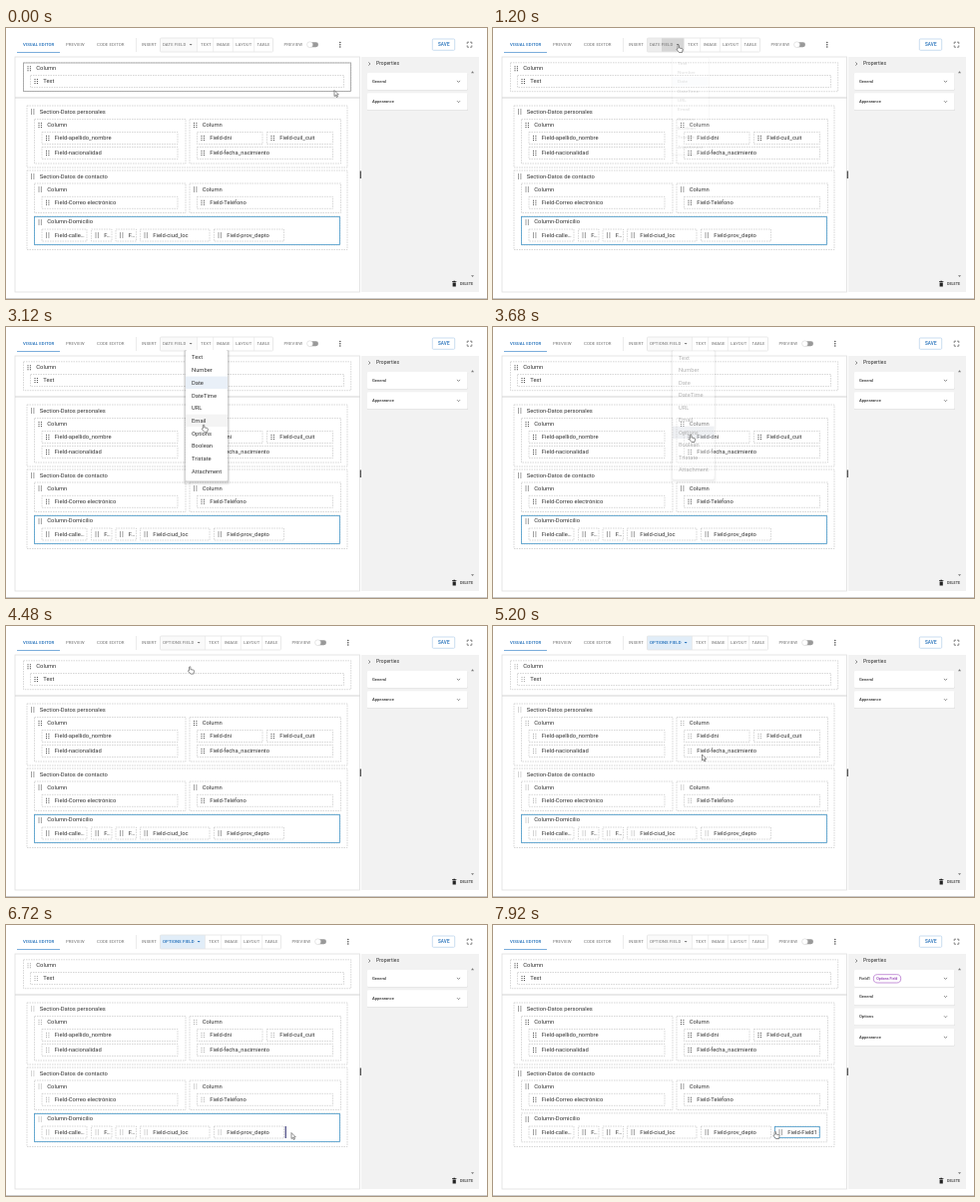
An HTML page for the animation above (8000 ms loop, 482 by 272 pixels).

```html
<!DOCTYPE html>
<html lang="es">
<head>
<meta charset="utf-8">
<title>Form editor</title>
<style>
html, body { margin: 0; width: 100%; height: 100%; overflow: hidden; background: #fff; }
svg { display: block; width: 482px; height: 272px; font-family: Roboto, sans-serif; }
.dash { fill: #fff; stroke: #bdbdbd; stroke-width: .6; stroke-dasharray: 1.5 1; }
.solid { fill: none; stroke-width: .8; }
.label { font-size: 5.8px; fill: #333; }
.tool { font-size: 4.3px; letter-spacing: .09px; fill: #707070; }
.blue { fill: #1c6bb8; font-weight: 500; }
.prop { font-size: 4.1px; font-weight: 500; fill: #333; }
.line { fill: none; stroke: #555; stroke-width: .7; }
</style>
</head>
<body>
<svg id="stage" viewBox="0 0 482 272"></svg>
<script>
const LOOP = 8000, STEP = 80;
const SELECTED = '#4b9bcb', HOVER = '#a0a0a0', FRAME = '#e4e4e4';
const stage = document.getElementById('stage');

function add(parent, tag, attrs = {}, text) {
  const el = document.createElementNS('http://www.w3.org/2000/svg', tag);
  for (const key in attrs) el.setAttribute(key, attrs[key]);
  if (text) el.textContent = text;
  parent.append(el);
  return el;
}
const group = (parent = stage) => add(parent, 'g');
const rect = (p, x, y, x2, y2, attrs) => add(p, 'rect', { x, y, width: x2 - x, height: y2 - y, ...attrs });
const path = (p, d, attrs) => add(p, 'path', { d, ...attrs });
const text = (p, x, y, s, cls) => add(p, 'text', { x, y, class: cls }, s);
const show = (el, on) => el.setAttribute('visibility', on ? 'visible' : 'hidden');
const fill = (el, color) => el.setAttribute('fill', color);
const clamp = v => Math.max(0, Math.min(1, v));
const smooth = u => u * u * (3 - 2 * u);

const grips = [];
function grip(p, x, y) {
  let d = '';
  for (const dx of [-1.2, 1.2])
    for (const dy of [-2, 0, 2]) d += `M${x + dx - .5} ${y + dy - .5}h1v1h-1z`;
  grips.push(path(p, d));
}
function block(p, x, y, x2, y2, name) {
  rect(p, x, y, x2, y2, { class: 'dash' });
  grip(p, x + 5.7, y + 6);
  text(p, x + 12.8, Math.floor(y + 8), name, 'label');
}
const outline = (p, x, y, x2, y2, stroke) => rect(p, x, y, x2, y2, { class: 'solid', stroke });

// Page and form canvas
path(stage, 'M0 271.5H482', { stroke: '#ccc' });
rect(stage, 9, 29, 354.5, 265, { fill: '#fff', stroke: '#dedede', 'stroke-width': .8 });
path(stage, 'M9 70H354.5', { stroke: '#cfcfcf', 'stroke-width': .9 });
const form = group();
[
  [17.5, 34.8, 345.7, 63.7, 'Column'], [24.5, 47.5, 338.5, 59.5, 'Text'],
  [21, 78, 342, 140, 'Section-Datos personales'],
  [28.5, 91.5, 180, 136, 'Column'], [184, 91.5, 335.5, 136, 'Column'],
  [36, 104.5, 172, 116.5, 'Field-apellido_nombre'], [36, 119.5, 172, 131.5, 'Field-nacionalidad'],
  [191.5, 104.5, 257, 116.5, 'Field-dni'], [261.5, 104.5, 327.5, 116.5, 'Field-cuil_cuit'],
  [191.5, 119.5, 327.5, 131.5, 'Field-fecha_nacimiento'],
  [21, 143, 342, 222.5, 'Section-Datos de contacto'],
  [28.5, 156, 180, 185.5, 'Column'], [184, 156, 335.5, 185.5, 'Column'],
  [36, 169.3, 172, 181.3, 'Field-Correo electrónico'], [191.5, 169.3, 327.5, 181.3, 'Field-Teléfono'],
  [28.5, 188.9, 334.7, 217.8, 'Column-Domicilio'],
  [36, 202, 81, 214, 'Field-calle…'], [85.5, 202, 106, 214, 'F…'], [110, 202, 130.5, 214, 'F…'],
  [134.5, 202, 204, 214, 'Field-ciud_loc'], [208.5, 202, 278.5, 214, 'Field-prov_depto']
].forEach(b => block(form, ...b));
const columnHover = outline(stage, 17.5, 35, 345.5, 63.5, HOVER);
const columnSelected = outline(stage, 28.5, 189.4, 334.5, 217.5, SELECTED);
const dropBar = rect(stage, 279.6, 202, 281, 214, { fill: '#5c5c90' });
const newField = group();
block(newField, 282.5, 202, 327, 214, 'Field-Field1');
outline(newField, 282.5, 202.4, 327.3, 213.6, SELECTED);

// Toolbar
text(stage, 17, 18, 'VISUAL EDITOR', 'tool blue');
text(stage, 60, 18, 'PREVIEW', 'tool');
text(stage, 91, 18, 'CODE EDITOR', 'tool');
rect(stage, 11, 24, 54, 24.8, { fill: '#5c9ad2' });
path(stage, 'M130.5 10v14', { stroke: FRAME, 'stroke-width': .7 });
text(stage, 136, 18, 'INSERT', 'tool');
const fieldButton = rect(stage, 154.5, 10, 191, 24);
const ripple = rect(stage, 169, 10, 191, 24, { fill: '#d6d6d6' });
const fieldLabel = text(stage, 157, 18, '', 'tool');
const arrow = path(stage, 'M183.6 16h3l-1.5 1.6z');
const groupFrame = rect(stage, 154.5, 10, 267.5, 24, { rx: 1, class: 'solid', stroke: FRAME });
const rest = group();
path(rest, 'M191.5 10v14M207.7 10v14M227.3 10v14M248.7 10v14', { stroke: FRAME, 'stroke-width': .6 });
[[195, 'TEXT'], [211, 'IMAGE'], [230, 'LAYOUT'], [251.5, 'TABLE'], [278.5, 'PREVIEW']]
  .forEach(([x, s]) => text(rest, x, 18, s, 'tool'));
rect(rest, 302.5, 14.3, 313, 19.2, { rx: 2.4, fill: '#999' });
add(rest, 'circle', { cx: 304.5, cy: 16.7, r: 2.9, fill: '#fff', stroke: '#ccc', 'stroke-width': .5 });
for (const cy of [14.6, 16.8, 19]) add(rest, 'circle', { cx: 334.8, cy, r: .75, fill: '#444' });
rect(stage, 427.3, 11, 449.7, 22.3, { rx: 1, class: 'solid', stroke: '#bdd5ec' });
text(stage, 433, 18, 'SAVE', 'tool blue').style.fontSize = '4.6px';
path(stage, 'M462.2 16v-1.8h1.8M465 14.2h1.8V16M466.8 17.4v1.8H465M464 19.2h-1.8v-1.8', { class: 'line' });

// Properties panel
rect(stage, 356, 29, 474, 265, { fill: '#f2f2f2' });
rect(stage, 354.7, 143.5, 356, 151, { fill: '#555' });
path(stage, 'M363.4 34.4l1.5 1.6l-1.5 1.6', { class: 'line' });
text(stage, 371, 37, 'Properties', 'label').style.fontSize = '5px';
path(stage, 'M466 45.2h3l-1.5-1.9zM466 248.2h3l-1.5 1.9z', { fill: '#777' });
path(stage, 'M447.6 255.4h3.2v4h-3.2zM447 254.2h4.4v.7H447zM448.4 253.7h1.6v.6h-1.6z', { fill: '#222' });
text(stage, 455, 258, 'DELETE', 'prop').style.fontSize = '3.75px';

function cards(list) {
  const g = group();
  for (const [y, name] of list) {
    rect(g, 362, y + .5, 463, y + 17.6, { rx: 1, fill: '#dedede' });
    rect(g, 362, y, 462.5, y + 17, { rx: 1, fill: '#fff' });
    text(g, 367, Math.floor(y + 10), name, 'prop');
    path(g, `M452 ${y + 7.9}l1.5 1.5l1.5-1.5`, { class: 'line' });
  }
  return g;
}
const columnProps = cards([[45, 'General'], [65.3, 'Appearance']]);
const fieldProps = cards([[45, 'Field1'], [63.2, 'General'], [83.4, 'Options'], [104, 'Appearance']]);
rect(fieldProps, 381.3, 49.7, 408.7, 58, { rx: 4.1, fill: '#fff', stroke: '#a04cc0', 'stroke-width': .6 });
text(fieldProps, 384.2, 55, 'Options Field', 'prop').setAttribute('style', 'font-size:3.6px;fill:#8e35b0');

// Field type menu
const menu = group();
const ROW = 12.7, ROWS_TOP = 24.2;
for (let i = 4; i > 0; i--)
  rect(menu, 180 - i * .6, 23, 222 + i * .6, 154.5 + i, { rx: 2, fill: '#000', opacity: .05 });
rect(menu, 180, 23, 222, 154.5, { rx: 1.5, fill: '#fff' });
const rows = ['Text', 'Number', 'Date', 'DateTime', 'URL', 'Email', 'Options', 'Boolean', 'Tristate', 'Attachment']
  .map((name, i) => {
    const y = ROWS_TOP + i * ROW;
    const back = rect(menu, 180, y, 222, y + ROW);
    text(menu, 186, y + 8.2, name, 'label');
    return back;
  });

// Pointer
const pointer = group();
const look = { fill: '#fff', stroke: '#444', 'stroke-width': .6, 'stroke-linejoin': 'round' };
const arrowPointer = path(pointer, 'M0 0V6L1.4 4.8L2.4 7L3.4 6.5L2.4 4.4H4.3Z', look);
const handPointer = path(pointer,
  'M.6 .6Q1.3-.4 2 .6V3L5 3.6Q5.8 3.9 5.6 4.8L5 7.5H2L-.4 4.7Q-.5 3.7 .6 4.1Z', look);

const TRACK = [
  [0, 329, 62.5], [80, 329, 62.5], [240, 330, 56], [400, 330, 56], [880, 184.5, 17],
  [2240, 184.5, 17], [2560, 196, 69], [2800, 196, 69], [3280, 197, 108],
  [4160, 197, 108], [4640, 178, 17], [4800, 178, 17], [5200, 209.5, 129], [5600, 286, 210],
  [5680, 286, 210], [6080, 286, 208.5], [6720, 286, 208.5], [6800, 285, 208],
  [6960, 285, 208], [7600, 281.5, 207], [LOOP, 281.5, 207]
];
function pointerAt(t) {
  const i = TRACK.findIndex(k => k[0] > t);
  const [t0, x0, y0] = TRACK[i - 1], [t1, x1, y1] = TRACK[i];
  const u = smooth((t - t0) / (t1 - t0));
  return [x0 + (x1 - x0) * u, y0 + (y1 - y0) * u];
}

function drawMenu(t, y) {
  const open = clamp((t - 1120) / 240), close = clamp((t - 3600) / 240);
  const grow = 1 - (1 - open) ** 1.25;
  const size = close > 0 ? 1 - Math.max(0, close - .3) : grow;
  const alpha = close > 0 ? (1 - close) ** 2.5 : grow * grow;
  show(menu, alpha > 0);
  menu.setAttribute('opacity', alpha);
  menu.setAttribute('transform',
    `translate(180 48) scale(${.75 + .25 * size} ${.5625 + .4375 * size}) translate(-180 -48)`);
  const hovered = t >= 2320 ? Math.floor((y + 2 - ROWS_TOP) / ROW) : -1;
  const selected = t < 3600 ? 2 : 6;
  rows.forEach((row, i) => fill(row,
    i === 6 && t >= 3520 ? '#d3d7df' : i === selected ? '#e9f0f8' : i === hovered ? '#f4f4f4' : '#fff'));
}

function render(t) {
  const [x, y] = pointerAt(t);
  const options = t >= 3600, inserting = t >= 4720 && t < 7840, dropped = t >= 7840;
  const hand = (t >= 720 && t < 4880) || t >= 7600;

  pointer.setAttribute('transform', `translate(${x} ${y})`);
  show(handPointer, hand);
  show(arrowPointer, !hand);

  show(columnHover, t < 880 && y > 34);
  show(columnSelected, !dropped);
  show(dropBar, t >= 5600 && !dropped);
  newField.style.display = dropped ? '' : 'none';
  grips.forEach(g => fill(g, inserting ? '#aaa' : '#444'));
  columnProps.style.display = t < 7920 ? '' : 'none';
  fieldProps.style.display = t < 7920 ? 'none' : '';

  const shift = options ? 8 : 0;
  const hover = (t >= 800 && t < 1360) || (t >= 4560 && t < 4720);
  fieldLabel.textContent = options ? 'OPTIONS FIELD' : 'DATE FIELD';
  fieldLabel.setAttribute('class', inserting ? 'tool blue' : 'tool');
  fill(arrow, inserting ? '#1c6bb8' : '#707070');
  fill(fieldButton, inserting ? '#e1edf8' : hover ? '#ededed' : '#fafafa');
  show(ripple, t >= 1120 && t < 1360);
  fieldButton.setAttribute('width', 37 + shift);
  groupFrame.setAttribute('width', 113 + shift);
  for (const el of [rest, arrow]) el.setAttribute('transform', `translate(${shift})`);
  drawMenu(t, y);
}

function tick() {
  render(Math.floor(performance.now() % LOOP / STEP) * STEP);
  requestAnimationFrame(tick);
}
tick();
</script>
</body>
</html>
```
